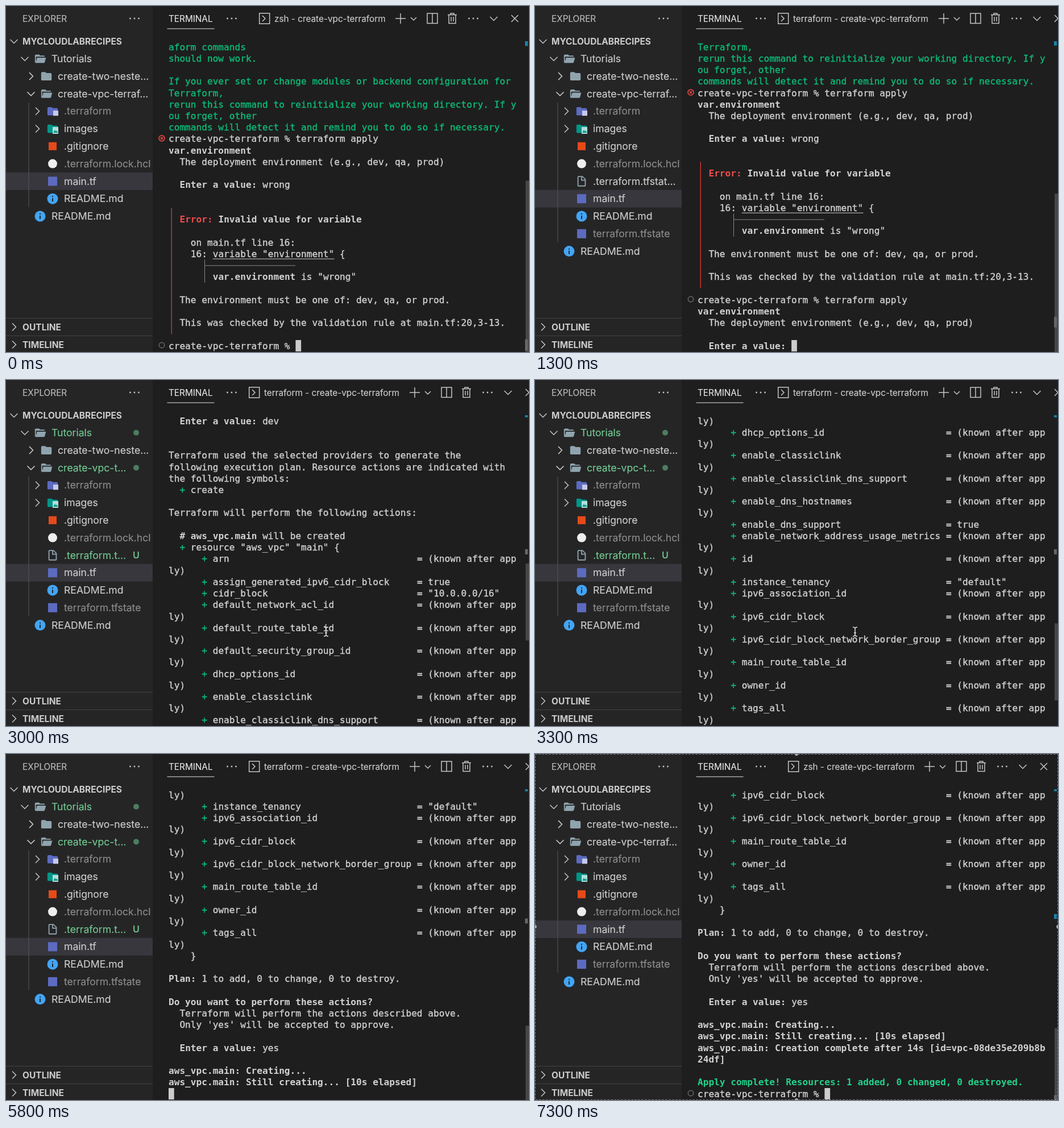
These frames come from a looping animation (920 px wide and 609 px high, 7.59 s). An HTML page:

```html
<!DOCTYPE html>
<html lang="en">
<head>
<meta charset="utf-8">
<title>Terminal session</title>
<style>
  html, body { margin: 0; width: 100%; height: 100%; overflow: hidden; background: #1e1e1e; }
  svg { display: block; width: 920px; height: 609px; }
  text { white-space: pre; font: 17.6px Inter, sans-serif; color: #ccc; fill: currentColor; stroke: currentColor; stroke-width: .15; }
  .head { font-size: 15.3px; }
  .section { font-size: 15.5px; font-weight: 700; stroke: none; }
  .term { font: 16.135px "DejaVu Sans Mono", monospace; color: #d2d2d2; stroke-width: .35; }
  .bold { font-weight: 700; stroke: none; }
  .line { fill: none; stroke: #c5c5c5; stroke-width: 1.5; }
</style>
</head>
<body>
<svg id="stage" viewBox="0 0 920 609"></svg>
<script>
const LOOP = 7590, ROWS = 27, FIRST = 22;
const CELL = 9.714, PITCH = 20.23, LEFT = 286, TOP = 62, TRACK = 547;
const GREEN = '#0dbc79', TREE_GREEN = '#73c991', DIM = '#8c8c8c', PURPLE = '#5c6bc0';
const stage = document.getElementById('stage');

// Inline styles in terminal lines: the mark opens and closes a span.
const SPANS = {
  '*': 'class="term bold"',
  '^': `class="term" style="color:${GREEN}"`,
  '~': 'class="term bold" style="color:#f14c4c"',
  '$': 'class="term bold" style="color:#23d18b"',
  '@': 'class="term"',
};

const attr = (name, value) => {
  const start = `      ^+^ ${name.padEnd(36)} = `;
  return value ? [start + value] : [start + '(known after app', 'ly)'];
};
const unknown = (...names) => names.flatMap(name => attr(name));
const PROMPT = 'create-vpc-terraform % ';
const ask = answer => [
  '*var.environment*',
  '  The deployment environment (e.g., dev, qa, prod)',
  '',
  '  *Enter a value:* ' + answer,
  '',
];

const lines = [
  '^aform commands^',
  '^should now work.^',
  '',
  '^If you ever set or change modules or backend configuration for^',
  '^Terraform,^',
  '^rerun this command to reinitialize your working directory. If y^',
  '^ou forget, other^',
  '^commands will detect it and remind you to do so if necessary.^',
  PROMPT + 'terraform apply',
  ...ask('wrong'),
  '',
  '  ~Error:~ *Invalid value for variable*',
  '',
  '    on main.tf line 16:',
  '    16: @variable "environment"@ {',
  '',
  '        *var.environment* is "wrong"',
  '',
  '  The environment must be one of: dev, qa, or prod.',
  '',
  '  This was checked by the validation rule at main.tf:20,3-13.',
  '',
  PROMPT + 'terraform apply',
  ...ask('dev'),
  '',
  'Terraform used the selected providers to generate the',
  'following execution plan. Resource actions are indicated with',
  'the following symbols:',
  '  ^+^ create',
  '',
  'Terraform will perform the following actions:',
  '',
  '  *# aws_vpc.main* will be created',
  '  ^+^ resource "aws_vpc" "main" {',
  ...attr('arn'),
  ...attr('assign_generated_ipv6_cidr_block', 'true'),
  ...attr('cidr_block', '"10.0.0.0/16"'),
  ...unknown('default_network_acl_id', 'default_route_table_id', 'default_security_group_id',
    'dhcp_options_id', 'enable_classiclink', 'enable_classiclink_dns_support', 'enable_dns_hostnames'),
  ...attr('enable_dns_support', 'true'),
  ...unknown('enable_network_address_usage_metrics', 'id'),
  ...attr('instance_tenancy', '"default"'),
  ...unknown('ipv6_association_id', 'ipv6_cidr_block', 'ipv6_cidr_block_network_border_group',
    'main_route_table_id', 'owner_id', 'tags_all'),
  '    }',
  '',
  '*Plan:* 1 to add, 0 to change, 0 to destroy.',
  '',
  '*Do you want to perform these actions?*',
  '  Terraform will perform the actions described above.',
  "  Only 'yes' will be accepted to approve.",
  '',
  '  *Enter a value:* yes',
  '',
  '*aws_vpc.main: Creating...*',
  '*aws_vpc.main: Still creating... [10s elapsed]*',
  '*aws_vpc.main: Creation complete after 14s [id=vpc-08de35e209b8b*',
  '*24df]*',
  '',
  '$Apply complete! Resources: 1 added, 0 changed, 0 destroyed.$',
  PROMPT,
];

// [time, cursor row, cursor column]
const cursorSteps = [
  [0, 48, 23], [800, 49, 0], [900, 52, 17], [1400, 52, 18], [1500, 52, 19], [1600, 52, 20],
  [1700, 53, 0], [1800, 54, 0], [2300, 108, 17], [3500, 108, 18], [3600, 108, 19], [3700, 108, 20],
  [3800, 109, 0], [3900, 111, 0], [5800, 112, 0], [6500, 114, 0], [6600, 116, 23],
];

const text = (x, y, str, attrs = '') => `<text x="${x}" y="${y}" ${attrs}>${str}</text>`;
const rect = (x, y, w, h, fill) => `<rect x="${x}" y="${y}" width="${w}" height="${h}" fill="${fill}"/>`;
const circle = (x, y, r, fill) => `<circle cx="${x}" cy="${y}" r="${r}" fill="${fill}"/>`;
const ring = (x, y, r, color) => `<circle cx="${x}" cy="${y}" r="${r}" class="line" style="stroke:${color}"/>`;
const stroke = (x, y, d, style = '') =>
  `<path class="line" transform="translate(${x} ${y})" d="${d}" style="${style}"/>`;
const shape = (x, y, d, fill) =>
  `<path transform="translate(${x - 11} ${y - 11}) scale(.92)" d="${d}" fill="${fill}"/>`;
const chevron = (x, y, open) => stroke(x, y, open ? 'M-6.5-3L0 3.5 6.5-3' : 'M-3-6.5L3.5 0-3 6.5');
const smallChevron = x => stroke(x, 22, 'M-5-2L0 3 5-2');
const dots = x => [-7.5, 0, 7.5].map(d => circle(x + d, 22, 1.4, '#c5c5c5')).join('');

const CLOSED = 'M10 4H4a2 2 0 0 0-2 2v12a2 2 0 0 0 2 2h16a2 2 0 0 0 2-2V8a2 2 0 0 0-2-2h-8z';
const OPEN = 'M19 20H4a2 2 0 0 1-2-2V6a2 2 0 0 1 2-2h6l2 2h7a2 2 0 0 1 2 2H4v10l2.1-8h17.1l-2.3 8.5a2 2 0 0 1-1.9 1.5z';
const PAGE = 'M13 9h5.5L13 3.5zM6 2h8l6 6v12a2 2 0 0 1-2 2H6a2 2 0 0 1-2-2V4a2 2 0 0 1 2-2m5 2H6v16h12v-9h-7z';

const icons = {
  closed: (x, y) => shape(x, y, CLOSED, '#90a4ae'),
  open: (x, y) => shape(x, y, OPEN, '#90a4ae'),
  config: (x, y) => shape(x, y, CLOSED, PURPLE) + rect(x + 1, y - 1, 9, 9, '#c5cae9'),
  images: (x, y) => shape(x, y, CLOSED, '#009688') + rect(x, y - 3, 10, 12, '#b2dfdb') +
    `<path d="M${x + 1} ${y + 7}l3-5 2 3 1.5-2 2 4z" fill="#009688"/>`,
  git: (x, y) => rect(x - 7, y - 7, 14, 14, '#e64a19'),
  lock: (x, y) => circle(x, y, 8, '#eee'),
  tf: (x, y) => rect(x - 8, y - 8, 16, 16, PURPLE),
  page: (x, y) => shape(x, y, PAGE, '#90a4ae'),
  info: (x, y) => circle(x, y, 9.5, '#42a5f5') + rect(x - 1, y - 5, 2, 2, '#252526') +
    rect(x - 1, y - 1, 2, 6, '#252526'),
};

function sidebar(locked, saved, changed) {
  const tint = changed ? TREE_GREEN : '#ccc';
  // [level, icon, label, colour, chevron, badge]
  const items = [
    [0, 'open', 'Tutorials', tint, 'open', changed && 'dot'],
    [1, 'closed', 'create-two-neste...', '#ccc', 'closed'],
    [1, 'open', changed ? 'create-vpc-t...' : 'create-vpc-terraf...', tint, 'open', changed && 'dot'],
    [2, 'config', '.terraform', DIM, 'closed'],
    [2, 'images', 'images', '#ccc', 'closed'],
    [2, 'git', '.gitignore', '#ccc'],
    [2, 'lock', '.terraform.lock.hcl', DIM],
    locked && [2, 'page', changed ? '.terraform.t...' : '.terraform.tfstat...', tint, '', changed && 'U'],
    [2, 'tf', 'main.tf', '#ccc'],
    [2, 'info', 'README.md', '#ccc'],
    saved && [2, 'tf', 'terraform.tfstate', DIM],
    [0, 'info', 'README.md', '#ccc'],
  ].filter(Boolean);

  let out = rect(0, 0, 258, 609, '#252526') + text(29, 27.5, 'EXPLORER', 'class="head" style="color:#bbb"') +
    dots(226) + chevron(14, 62, true) + text(29, 67.6, 'MYCLOUDLABRECIPES', 'class="section"');
  items.forEach(([level, icon, label, color, arrow, badge], i) => {
    const y = 62 + 30.8 * (i + 1), x = 60 + 11 * level;
    if (label === 'main.tf') out += rect(0, y - 15.5, 258, 31, '#37373d');
    if (arrow) out += chevron(x - 27, y, arrow === 'open');
    out += icons[icon](x, y) + text(x + 20, y + 6.2, label, `style="color:${color}"`);
    if (badge === 'dot') out += circle(229, y, 5, '#4c7d5f');
    if (badge === 'U') out += text(223, y + 6, 'U', `style="color:${TREE_GREEN};font-size:16px;font-weight:500"`);
  });
  out += rect(39.5, 170, 1, 30.8 * items.length - 124, '#585858');
  [['OUTLINE', 565], ['TIMELINE', 596]].forEach(([label, y]) => {
    out += rect(0, y - 16, 258, 1, '#434344') + chevron(14, y, false) + text(29, y + 5.6, label, 'class="section"');
  });
  return out;
}

function header(running) {
  const x = running ? 427 : 445, d = running ? 25 : 0;
  return text(286, 27.5, 'TERMINAL', 'class="head" style="color:#e7e7e7"') + rect(283.5, 39.5, 83, 1, '#e7e7e7') + dots(397) +
    stroke(x, 12, 'M.7.7h18v18.6h-18zM6 5l5 5-5 5') +
    text(x + 27, 27.5, (running ? 'terraform' : 'zsh') + ' - create-vpc-terraform', 'class="head"') +
    stroke(694 + d, 22, 'M-9 0H9M0-9V9') + smallChevron(717 + d) +
    stroke(750 + d, 22, 'M-9-9H9V8.5H-9zM0-9V8.5') +
    stroke(785 + d, 22, 'M-8-6.5H8M-3-6.5V-9H3v2.5M-6-6.5V8.5H6V-6.5M-2-3V5M2-3V5') +
    dots(822 + d) + stroke(858 + d, 22, 'M-6.5-3L0 3.5 6.5-3') +
    stroke(895 + d, 22, 'M-6-6L6 6M6-6L-6 6');
}

function termLine(line, y, limit) {
  let col = 0, out = '';
  for (const part of line.split(/([*^~@$][^*^~@$]+[*^~@$])/)) {
    const span = SPANS[part[0]];
    const str = (span ? part.slice(1, -1) : part).slice(0, Math.max(0, limit - col));
    const x = LEFT + col * CELL;
    if (str) out += text(x, y + 5.6, str, span || 'class="term"');
    if (part[0] === '@') out += rect(x, y + 8.5, str.length * CELL, 1, '#ccc');
    col += str.length;
  }
  return out;
}

function terminal(ms, step) {
  let [, end, col] = cursorSteps.findLast(([at]) => at <= ms);
  if (step > 0 && step < 8) col += Math.min(15, 2 * step + 1);
  const total = end + 1;
  const scrolling = step >= 26 && step < 34;
  const offset = scrolling ? 52 + 7 * Math.abs(step - 30) : total - ROWS;
  const rowY = row => TOP + 10 + (row - offset) * PITCH;
  const visible = row => row >= offset && row < offset + ROWS && row <= end;
  let out = '';

  for (let row = offset; visible(row); row++)
    out += termLine(lines[row - FIRST], rowY(row), row === end ? col : Infinity);
  if (visible(end)) out += rect(LEFT + col * CELL, rowY(end) - 10, 9.7, 20, '#ccc');

  if (visible(30)) out += ring(274, rowY(30) - 1, 5, '#f14c4c') +
    stroke(274, rowY(30) - 1, 'M-2-2L2 2M2-2L-2 2', 'stroke:#f14c4c');
  for (const row of [48, 116]) if (visible(row)) out += ring(274, rowY(row) - 1, 4.7, '#6a6a6a');

  // Frame around the error message
  if (offset < 36) out += rect(290.5, rowY(36), 1.5, 11 * PITCH, '#cd3131') +
    rect(349, rowY(41) - 10, 1, 2 * PITCH, '#888') + rect(349, rowY(41), 160, 1, '#888');

  const unit = TRACK / total;
  const mark = (row, size, color) => rect(913, TOP + row * unit, 5, size * unit, color);
  out += rect(914, TOP + offset * unit, 6, ROWS * unit, 'rgba(121,121,121,.45)') +
    mark(0, .75, '#1b81a8') + mark(47, 1.8, end === 116 ? '#1b81a8' : '#666');
  if (end === 116) out += mark(115.2, 1.8, '#666');
  if (scrolling) out += stroke(563, 443, 'M-4-8Q0-8 0-5Q0-8 4-8M0-5V5M-4 8Q0 8 0 5Q0 8 4 8M-2 2H2', 'stroke:#ddd');
  return out;
}

function selection() {
  const handles = [[460, 0], [0, 304], [460, 609], [920, 304]];
  return '<rect x=".5" y=".5" width="919" height="608" class="line" style="stroke:#808080;stroke-width:1;stroke-dasharray:3"/>' +
    handles.map(([x, y]) => circle(x, y, 3, '#aaa')).join('');
}

let shown = -1;
function frame(now) {
  const ms = now % LOOP, step = Math.floor(ms / 100);
  if (step !== shown) {
    shown = step;
    const between = (from, to) => ms >= from && ms < to;
    stage.innerHTML = sidebar(between(1000, 6800), ms >= 1000, between(1900, 6800)) +
      rect(258, 0, 662, 609, '#1e1e1e') + header(between(800, 6700)) + terminal(ms, step) +
      (ms >= 7200 ? selection() : '');
  }
  requestAnimationFrame(frame);
}
frame(0);
</script>
</body>
</html>
```
